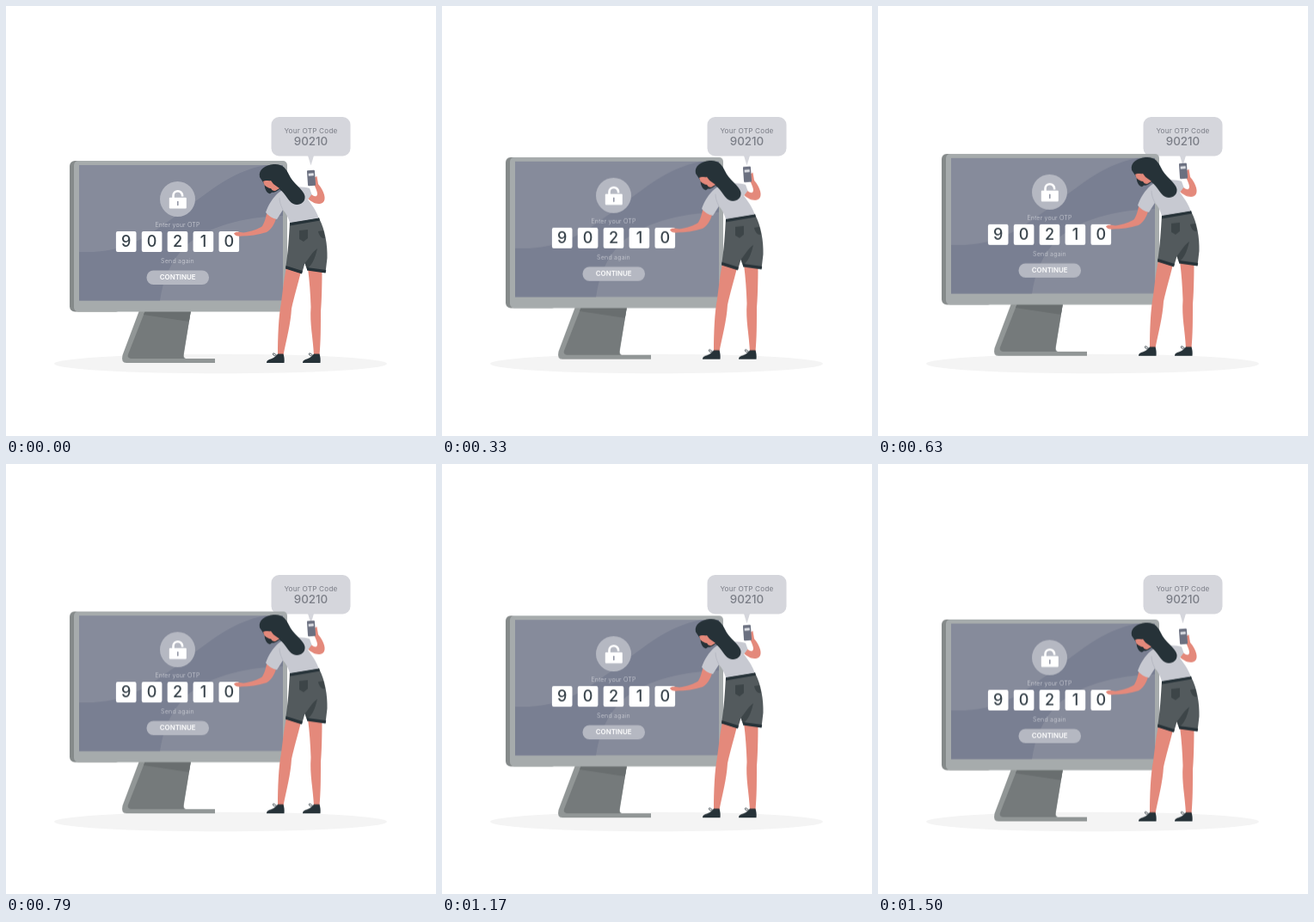
Recreate the animation shown at these times as an HTML page without scripts. Size 500 by 500 pixels, loop 1.54 s.

```html
<!DOCTYPE html>
<html lang="en">
<head>
<meta charset="utf-8">
<title>One-time code</title>
<style>
  html, body { margin: 0; width: 100%; height: 100%; overflow: hidden; background: #fff; }
  svg { display: block; width: 100%; height: 100%; }
  text { font-family: Inter, "Open Sans", sans-serif; text-anchor: middle; }
  .float { animation: float 1.54s linear infinite; }
  @keyframes float {
    0%, 100% { transform: translateY(0); }
    47.4% { transform: translateY(-9.5px); }
    97.4% { transform: translateY(.5px); }
  }
  .skin { fill: #e4897b; }
  .dark { fill: #263238; }
  .shirt { fill: #c7c9d1; }
  .cloth { fill: #535a5d; }
  .shade { fill: #3d4548; }
  .pale { fill: #b5b8c2; }
  .digits { font-size: 18px; font-weight: 500; fill: #37424a; }
  .hint { font-size: 7.1px; font-weight: 300; fill: #d0d2d9; }
  .button { font-size: 7.9px; font-weight: 600; fill: #fff; }
  .note { fill: #7b7e87; }
</style>
</head>
<body>
<svg viewBox="0 0 500 500">
  <defs>
    <rect id="cell" x="-11.8" y="262" width="23.6" height="24" rx="2" fill="#fff"/>
    <g id="shoe">
      <path class="dark" d="M303 415C303 412 306 411 309 410C312 409 314 407 316 404.500L322.500 404.500C323.500 408 324 411 323.500 415Z"/>
      <path d="M314 407C310 407 309 403 312 404L315 406.500" fill="none" stroke="#263238" stroke-width=".8"/>
    </g>
    <clipPath id="screen"><rect x="85" y="185" width="237" height="157.500"/></clipPath>
  </defs>

  <ellipse cx="249.500" cy="416" rx="193.500" ry="11.300" fill="#f4f4f4"/>

  <g fill="#d5d6dc">
    <rect x="308.500" y="129" width="92" height="45.500" rx="9"/>
    <path d="M351 174H358L354.500 185.500Z"/>
  </g>
  <text class="note" x="354.500" y="148" font-size="8.200" letter-spacing=".2">Your OTP Code</text>
  <text class="note" x="354.500" y="161.500" font-size="13.400" font-weight="500">90210</text>

  <g class="float">
    <!-- stand -->
    <path d="M155 354L135.500 406Q133.500 415 140 415H243V410H209Q206 409 207 404L215 354Z" fill="#919696"/>
    <path d="M162 354H215L206.500 404Q205 410 209 410H145Q140.500 409 142 405Z" fill="#757a7b"/>
    <path d="M162 354H215L212.800 367L160 359Z" fill="#696e6f"/>

    <!-- monitor -->
    <rect x="74" y="180" width="60" height="175.500" rx="6" fill="#858a8a"/>
    <rect x="79" y="180" width="248" height="175.500" rx="5" fill="#a6abac"/>
    <g clip-path="url(#screen)">
      <rect x="85" y="185" width="237" height="158" fill="#868b9b"/>
      <path d="M85 286C140 288 165 267 195 246C232 220 258 193 302 185H322V244C275 245 232 257 208 280C191 297 182 320 179 343H85Z" fill="#797f92"/>
    </g>

    <!-- padlock -->
    <circle class="pale" cx="199.500" cy="224.500" r="20.500"/>
    <path d="M194.500 224V220.500A5.300 5.300 0 0 1 205.100 220.500V221.500" fill="none" stroke="#fff" stroke-width="2.600"/>
    <rect x="189.800" y="222.800" width="20" height="12.700" rx="1" fill="#fff"/>
    <path d="M199.800 227.500V231.500" stroke="#858a9b" stroke-width="1.400" stroke-linecap="round"/>

    <!-- form -->
    <text class="hint" x="199.500" y="257" letter-spacing=".15">Enter your OTP</text>
    <g class="digits">
      <g transform="translate(139.700)"><use href="#cell"/><text y="280.500">9</text></g>
      <g transform="translate(169.600)"><use href="#cell"/><text y="280.500">0</text></g>
      <g transform="translate(199.500)"><use href="#cell"/><text y="280.500">2</text></g>
      <g transform="translate(229.400)"><use href="#cell"/><text y="280.500">1</text></g>
      <g transform="translate(259.300)"><use href="#cell"/><text y="280.500">0</text></g>
    </g>
    <text class="hint" x="199.500" y="299" letter-spacing=".2">Send again</text>
    <rect class="pale" x="163.500" y="307.500" width="72.500" height="16.500" rx="8"/>
    <text class="button" x="199.700" y="318.500">CONTINUE</text>

    <!-- legs -->
    <g class="skin">
      <path d="M326 304L343 309C339 325 335 338 332 352C331 370 326 388 322.500 406L316 406C316 385 317 360 320 345C322 330 323 318 326 304Z"/>
      <path d="M351 305L367.500 307C367.500 325 367 345 366 355C366 375 366 390 364.500 406L358 406C357 385 353 370 354.500 350C354 335 353 320 351 305Z"/>
    </g>
    <use href="#shoe"/>
    <use href="#shoe" x="42"/>

    <!-- shorts -->
    <path class="cloth" d="M330 252L364 247C371 260 374 278 373.500 293L371.500 310L350 306L347.500 299L344 311L325 305C328 288 329 268 330 252Z"/>
    <path class="shade" d="M341 261L351 260V270L346 274L341 271ZM363 262L369 261L371 270C367 271 364 267 363 262ZM347.500 299C353 293 355 287 362 282C360 290 358 299 350 306Z"/>
    <path class="dark" d="M330 251.500L364 246L365 249.500L330 255.500ZM325.600 302L344.800 308L344 311.500L325 305.500ZM350 304L372.200 307L371.500 310.500L350 307.500Z"/>

    <!-- arms and phone -->
    <path class="skin" d="M304 238L315 244C312 255 308 260 303 263C293 266 283 267.500 274 267.500C270 268.500 266 267 265 264.500C267 261.500 272 263 276 263.500C285 262.500 294 259 298 256C301 251 302 246 304 238Z"/>
    <path class="skin" d="M350 223C356 229 363 232 368.500 228.500C373 225 370 215 363 207L361.500 198L357 200L358.500 208C361 214 363.500 219 361 221C358.500 222 356 220 353 217Z"/>
    <g transform="rotate(-4 355 200)">
      <rect x="350.500" y="191" width="9" height="18" rx="1" fill="#6b7080"/>
      <rect x="352" y="194.500" width="6" height="3" fill="#dfe1e6"/>
    </g>

    <!-- shirt -->
    <path class="shirt" d="M317 217C325 209 345 209 353 212L355.500 219L351 225C358 234 362 241 363.500 246.500L330 252C328 246 326 241 322 237L315 248C310 247 305 244 302 240C305 231 311 222 317 217Z"/>
    <path d="M322 237C319 231 318 227 318 223" fill="none" stroke="#b1b4be" stroke-width=".7"/>

    <!-- head -->
    <path class="dark" d="M295 199C293 190 302 185 311 184C321 183 326 189 329 196C333 206 346 213 347.500 221C348.500 229 340 233 334 230C328 227 326 219 318 213C310 220 301 217 301 208Z"/>
    <path class="skin" d="M299 204C303 202 305 204 308 203L311 207L318 212L313 215C310 215 309 214 308 212C304 213 300.500 211 300.500 208Z"/>
    <path class="dark" d="M300.500 208C304 212 307 211 309 214C310 216 308 219 306 218C303 217 301 213 300.500 208Z"/>
  </g>
</svg>
</body>
</html>
```
